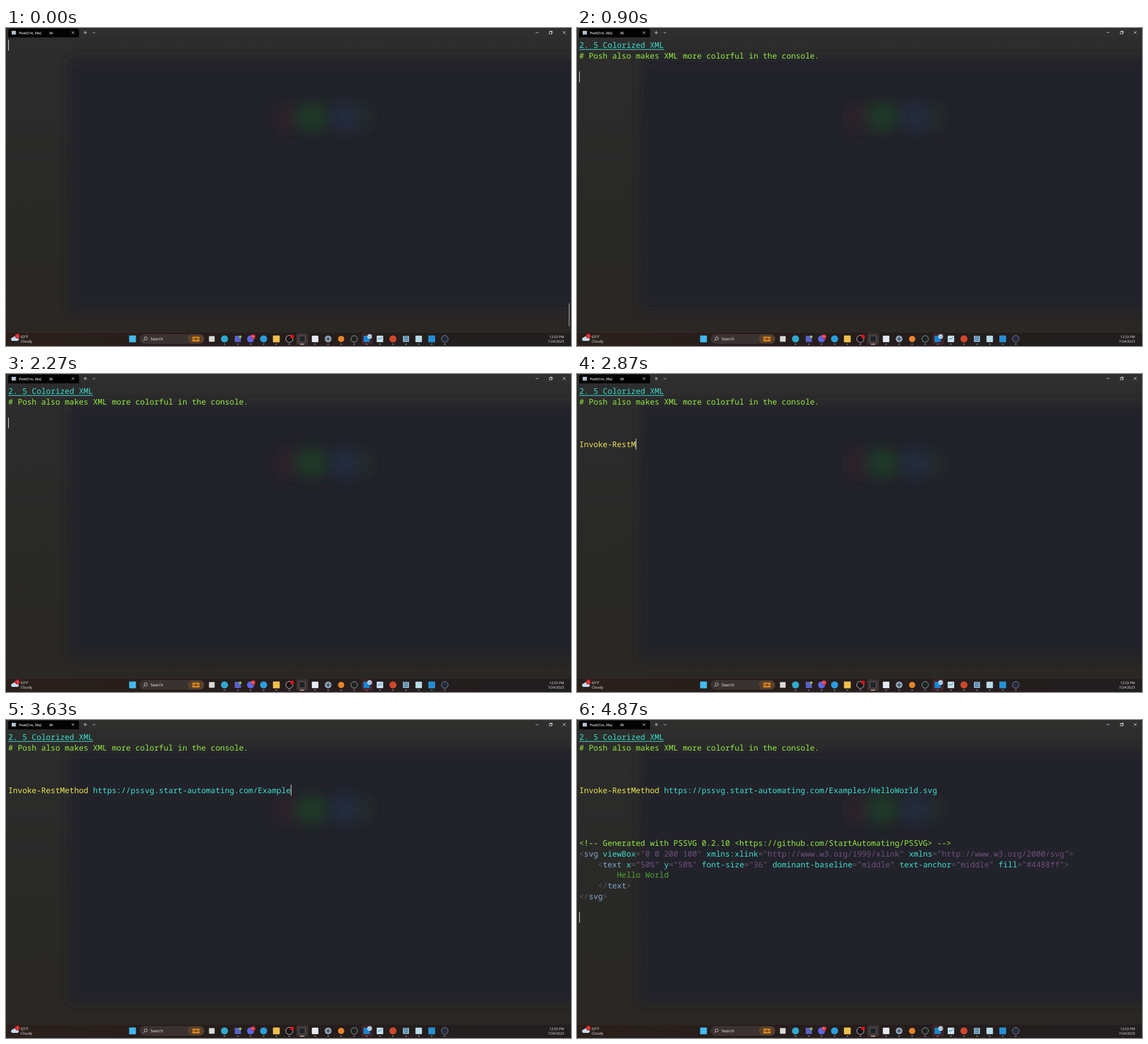
Recreate the animation shown at these times as an HTML page. Size 998 by 561 pixels, loop 4.91 s.

```html
<!DOCTYPE html>
<html lang="en">
<head>
<meta charset="utf-8">
<title>Colorized XML in a terminal</title>
<style>
  html, body { margin: 0; width: 100%; height: 100%; overflow: hidden; background: #292927; }
  svg { display: block; width: 998px; height: 561px; }
  text { font-family: "Open Sans", "Noto Sans", sans-serif; fill: #f4f4f4; white-space: pre; text-rendering: geometricPrecision; }
  #terminal text { font-family: "Noto Sans Mono", "DejaVu Sans Mono", monospace; font-size: 13.867px; }
  .line { fill: none; stroke: #e8e8e8; stroke-width: .8; }
</style>
</head>
<body>
<svg viewBox="0 0 998 561">
  <defs>
    <linearGradient id="edge" x2="0" y2="1">
      <stop offset="0" stop-color="#2d2d2d"/>
      <stop offset=".5" stop-color="#292927"/>
      <stop offset="1" stop-color="#2a2723"/>
    </linearGradient>
    <linearGradient id="bar">
      <stop offset="0" stop-color="#2a201b"/>
      <stop offset=".5" stop-color="#251d1c"/>
      <stop offset="1" stop-color="#221e1f"/>
    </linearGradient>
    <filter id="soft" x="-10%" y="-10%" width="120%" height="120%"><feGaussianBlur stdDeviation="9"/></filter>
    <filter id="glow" x="-100%" y="-100%" width="300%" height="300%"><feGaussianBlur stdDeviation="11"/></filter>
  </defs>

  <rect width="998" height="561" fill="url(#edge)"/>
  <rect x="112" y="53" width="940" height="446" fill="#22212b" filter="url(#soft)"/>
  <g filter="url(#glow)">
    <ellipse cx="494" cy="158" rx="13" ry="24" fill="#30212a"/>
    <ellipse cx="540" cy="157" rx="29" ry="27" fill="#1f3825"/>
    <ellipse cx="598" cy="157" rx="24" ry="28" fill="#202a3c"/>
    <ellipse cx="632" cy="157" rx="11" ry="24" fill="#232d2c"/>
  </g>

  <rect width="998" height="16" fill="#2f2f2e"/>
  <path d="M4 16.5V5q0-4 4-4h117q4 0 4 4v11.5z" fill="#030303"/>
  <rect x="10" y="5" width="7.5" height="6.5" fill="#b4c3d1"/>
  <g font-size="5.9" font-weight="600">
    <text id="title" x="23" y="10.6"></text>
    <text id="seconds" x="76" y="10.6"></text>
  </g>
  <path class="line" d="M116 6l4.5 4.5m0-4.5l-4.5 4.5M137 8h6m-3-3v6M153 7l2.3 2.3L157.600 7M935.500 8h5M983.500 5.500l5 5m0-5l-5 5M961 6.500v-1h4v4h-1M959.700 6.500h4v4h-4z"/>

  <g id="terminal"></g>
  <rect id="cursor" x="4" width="1" height="19" fill="#f2f2f2"/>
  <rect id="scrollbar" x="994.3" y="486" width="1" height="40" fill="#d0d0d0"/>

  <rect y="536" width="998" height="25" fill="url(#bar)"/>
  <rect y="536" width="998" height=".7" fill="#3d3533"/>
  <path d="M12 552a3 3 0 0 1 0-6 4 4 0 0 1 7 0 3 3 0 0 1 1 6z" fill="#c3dcf5"/>
  <circle cx="20" cy="543.5" r="4.2" fill="#d3222c"/>
  <text x="18.500" y="545.600" font-size="5.500">1</text>
  <text x="26" y="547" font-size="6.300">63°F</text>
  <text x="26" y="555.200" font-size="6.300">Cloudy</text>

  <rect x="236.500" y="540.500" width="113.500" height="16" rx="8" fill="#3a3230" stroke="#4a413e" stroke-width=".6"/>
  <circle class="line" cx="246.800" cy="547.600" r="2.700"/>
  <path class="line" d="M244.800 549.700l-2.500 2.500"/>
  <text x="255.300" y="551" font-size="7.050">Search</text>
  <rect x="321" y="541" width="28.500" height="15" rx="7.500" fill="#59412b"/>
  <rect x="329" y="544.500" width="13" height="8.500" rx="1.500" fill="#d8861f"/>
  <path d="M329 548h13v1.200h-13zM334 546.500h3v4h-3z" fill="#7a421a"/>

  <rect x="513" y="538.500" width="20.500" height="20" rx="2" fill="#3c3332"/>
  <rect x="628" y="538.500" width="20" height="20" rx="2" fill="#43252a"/>
  <g id="icons"></g>
  <path d="M565.500 548.500h7m-3.500-3.500v7" stroke="#343b45" stroke-width="1.500"/>
  <path d="M657 550l2-3 2 2 3-4" fill="none" stroke="#2677ac"/>
  <path d="M703.500 545h6M703.500 548h6M703.500 551h6" stroke="#315671" stroke-width="1.300" stroke-dasharray="1.500 .7"/>
  <g font-size="4.800" text-anchor="middle">
    <circle cx="436.500" cy="544.500" r="4" fill="#d92d3b"/><text x="436.500" y="546.200">9+</text>
    <circle cx="413.800" cy="544.800" r="2.300" fill="#92c353"/>
    <circle cx="505.300" cy="544.200" r="3.200" fill="#e80d12"/>
    <circle cx="642.300" cy="544.200" r="4" fill="#c4e6f7"/><text x="642.300" y="546" style="fill:#17405e">23</text>
  </g>
  <g font-size="6.020" text-anchor="end">
    <text x="985.700" y="546.800">12:53 PM</text>
    <text x="985.700" y="555">7/24/2023</text>
  </g>
</svg>

<script>
const LOOP = 4910, COLUMN = 8.32, ROW = 18.7, LEFT = 4;
const MS_PER_CHAR = 16, BLINK = 530;
const CYAN = '#3fe0d0', LIME = '#94ec3f', YELLOW = '#efe750';
const GREY = '#5c5c66', STEEL = '#82abd0', PURPLE = '#70507f', GREEN = '#50a82c';

const byId = id => document.getElementById(id);
const terminal = byId('terminal'), cursor = byId('cursor');

function add(parent, tag, attributes, content = '') {
  const node = document.createElementNS('http://www.w3.org/2000/svg', tag);
  for (const key in attributes) node.setAttribute(key, attributes[key]);
  node.textContent = content;
  return parent.appendChild(node);
}

// A terminal row made of [text, colour] runs, revealed up to a character count.
function makeRow(row, runs) {
  const line = add(terminal, 'text', { x: LEFT, y: 35.3 + ROW * row });
  const spans = runs.map(([, color]) => add(line, 'tspan', { style: `fill:${color}` }));
  const length = runs.reduce((sum, [text]) => sum + text.length, 0);
  let shown = -1;
  return {
    length,
    show(count) {
      if (count === shown) return;
      shown = count;
      runs.forEach(([text], i) => {
        spans[i].textContent = text.slice(0, Math.max(0, count));
        count -= text.length;
      });
    }
  };
}

function xmlRuns(source) {
  const tokens = source.match(/"[^"]*"|[\w:-]+(?==)|\w+|[^\w"]+?/g);
  return tokens.map((token, i) => [token,
    token[0] === '"' ? PURPLE :
    !/\w/.test(token) ? GREY :
    tokens[i + 1] === '=' ? CYAN : STEEL]);
}

const heading = makeRow(0, [['2. 5 Colorized XML', CYAN]]);
const underline = add(terminal, 'rect', { x: LEFT, y: 37.3, width: 18 * COLUMN, height: 1.1, fill: CYAN });
const comment = makeRow(1, [['# Posh also makes XML more colorful in the console.', LIME]]);
const command = makeRow(5, [
  ['Invoke-RestMethod ', YELLOW],
  ['https://pssvg.start-automating.com/Examples/HelloWorld.svg', CYAN]
]);
const output = [
  [['<!-- Generated with PSSVG 0.2.10 <https://github.com/StartAutomating/PSSVG> -->', LIME]],
  xmlRuns('<svg viewBox="0 0 200 100" xmlns:xlink="http://www.w3.org/1999/xlink" xmlns="http://www.w3.org/2000/svg">'),
  xmlRuns('    <text x="50%" y="50%" font-size="36" dominant-baseline="middle" text-anchor="middle" fill="#4488ff">'),
  [['        Hello World', GREEN]],
  xmlRuns('    </text>'),
  xmlRuns('</svg>')
].map((runs, i) => makeRow(10 + i, runs));

// Taskbar apps: shape, centre x, size, colour, running mark.
[
  ['square', 223.5, 12, '#42b9ef', 0], ['square', 363.5, 10, '#d9d9d9', 0],
  ['circle', 386, 12.5, '#2fa9cf', 1], ['square', 409.5, 11, '#5861c4', 1],
  ['circle', 432, 12.5, '#5966e8', 1], ['circle', 455, 12.5, '#2b9ddd', 1],
  ['square', 477.5, 12, '#f0c04d', 1], ['circle', 500.5, 12.5, '#16161a', 1, '#c9c9cc'],
  ['square', 523, 11, '#202328', 2, '#65676b'], ['square', 546, 11.5, '#e4eaf0', 1],
  ['circle', 569, 12, '#8ea6b9', 1], ['circle', 592, 11, '#e7842a', 1],
  ['circle', 615, 11.5, '#1c2423', 1, '#91aaa4'], ['square', 637, 11, '#1885d0', 3],
  ['square', 660.5, 11.5, '#c9e1ec', 1], ['circle', 683.5, 12.5, '#cf482d', 1],
  ['square', 706.5, 11, '#84b1cd', 1], ['square', 729, 11.5, '#b8dce6', 1],
  ['square', 752, 12, '#258fd5', 1], ['circle', 775, 12, '#252b3c', 1, '#7886a5']
].forEach(([shape, x, size, fill, mark, stroke = 'none']) => {
  const icons = byId('icons'), half = size / 2;
  if (shape === 'circle') add(icons, 'circle', { cx: x, cy: 548.5, r: half, fill, stroke });
  else add(icons, 'rect', { x: x - half, y: 548.5 - half, width: size, height: size, rx: 1, fill, stroke });
  if (!mark) return;
  const width = mark === 2 ? 8 : 3.5;
  add(icons, 'rect', {
    x: x - width / 2, y: 557, width, height: 1.4, rx: .7,
    fill: ['', '#93898a', '#edb4ae', '#d46a72'][mark]
  });
});

const toggle = (node, visible) => node.setAttribute('visibility', visible ? 'visible' : 'hidden');

function typed(row, start, t) {
  const count = Math.max(0, Math.min(row.length, Math.floor((t - start) / MS_PER_CHAR)));
  row.show(count);
  return count;
}

function draw(t) {
  const started = t >= 30, printed = t >= 4600;
  const second = !started ? 34 : t < 2700 ? 36 : 39;
  byId('title').textContent = `Posh[1m, ${second}s]`;
  byId('seconds').textContent = second;
  toggle(byId('scrollbar'), !started);
  toggle(underline, started);
  heading.show(started ? heading.length : 0);

  const commentCount = typed(comment, 40, t);
  const commandCount = typed(command, 2670, t);
  output.forEach(row => row.show(printed ? row.length : 0));

  let row = 0, column = 0, visible = true;
  if (printed) row = 17;
  else if (t >= 3905) row = 9;
  else if (t >= 2670) [row, column] = [5, commandCount];
  else if (t >= 870) {
    row = 3;
    visible = Math.floor((t - 870) / BLINK) % 2 === 0;
  } else if (started) [row, column] = [1, commentCount];

  cursor.setAttribute('x', LEFT - .1 + column * COLUMN);
  cursor.setAttribute('y', 20.7 + row * ROW);
  toggle(cursor, visible);
}

function frame() {
  draw(performance.now() % LOOP);
  requestAnimationFrame(frame);
}
frame();
</script>
</body>
</html>
```
